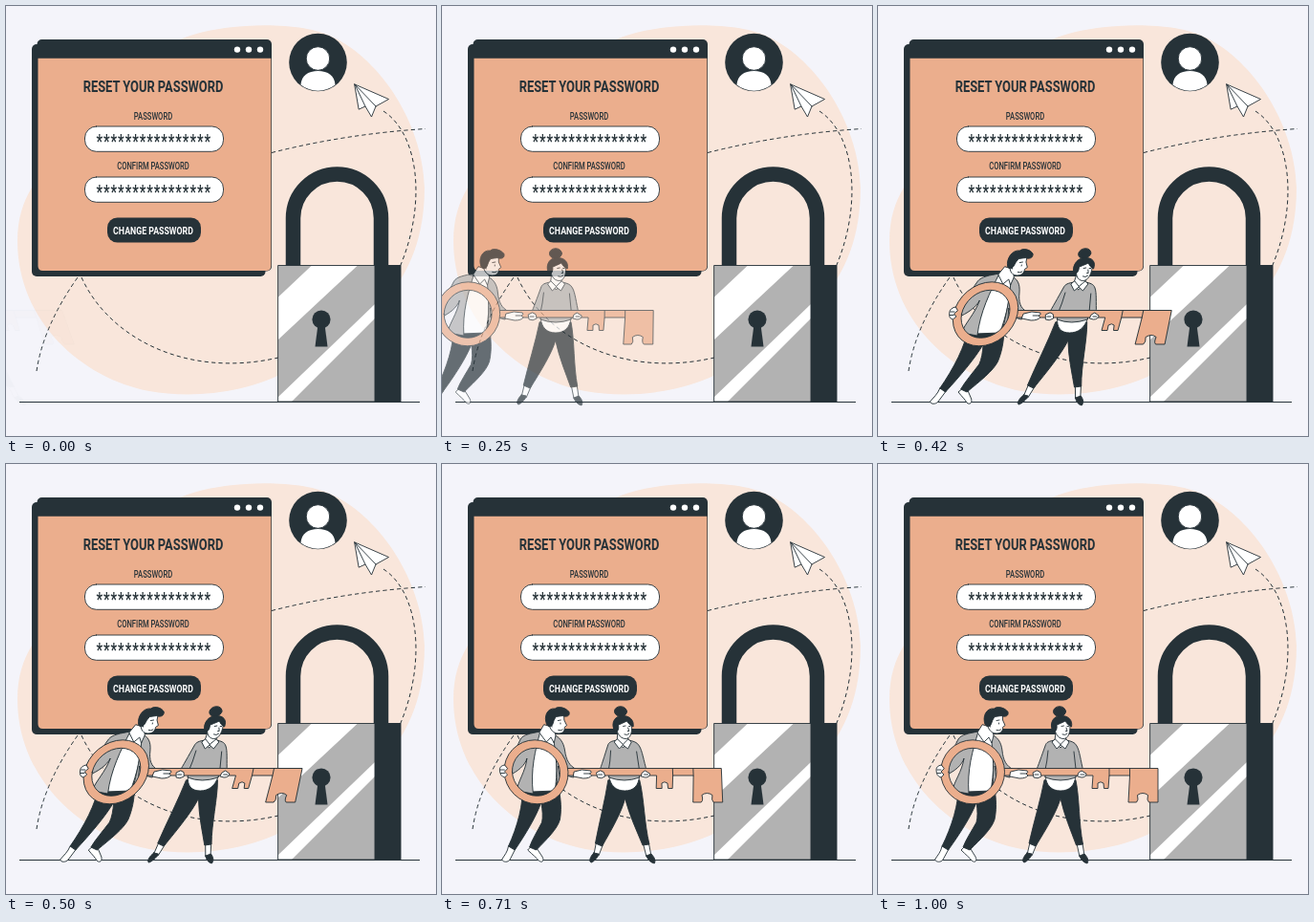
Recreate the animation shown at these times as an HTML page. Size 450 by 450 pixels, loop 1040 ms.

```html
<!DOCTYPE html>
<html lang="en">
<head>
<meta charset="utf-8">
<title>Reset your password</title>
<style>
  html, body { margin: 0; width: 100%; height: 100%; overflow: hidden; background: #f4f4fa; }
  svg { display: block; width: 100vw; height: 100vh; --ink: #263238; stroke-linejoin: round; stroke-linecap: round; }
  .ink { fill: var(--ink); }
  .white { fill: #fff; }
  .grey { fill: #b2b2b2; }
  .peach { fill: #ebae8d; }
  .line { stroke: var(--ink); stroke-width: .9; }
  .dash { fill: none; stroke: var(--ink); stroke-dasharray: 4.2 3.2; stroke-linecap: butt; }
  text { font: 500 10.2px Roboto, "Open Sans", sans-serif; text-anchor: middle; fill: var(--ink); }
  .title { font-size: 17.2px; font-weight: 700; }
  .stars { font-size: 20px; letter-spacing: 1.2px; }
  .action { font-size: 11.7px; font-weight: 700; fill: #fff; }
</style>
</head>
<body>
<svg viewBox="0 0 450 450">
  <path fill="#f9e6db" d="M12 246C12 222 18 205 27 190C58 140 115 55 196 30C238 17 312 16 343 33C392 57 436 122 438 190C438 290 380 335 300 379C250 408 190 410 150 403C80 390 12 330 12 246Z"/>

  <g class="dash">
    <path d="M278 153.500Q355 134 439 128.500"/>
    <path d="M395 110C432 134 440 206 413 271"/>
    <path d="M32 382Q39 335 75 284"/>
    <path d="M79 284C108 348 190 390 285 368"/>
  </g>
  <path class="ink" d="M14 414h419v1H14z"/>

  <!-- Browser window -->
  <g class="ink">
    <rect x="27" y="40" width="244.500" height="243" rx="5"/>
    <rect x="32.500" y="35" width="245.500" height="242.500" rx="5"/>
  </g>
  <path class="peach" d="M33.500 54.700H277.300V272q0 5-5 5H38.500q-5 0-5-5Z"/>
  <g class="white">
    <circle cx="242" cy="45.600" r="3.200"/>
    <circle cx="254" cy="45.600" r="3.200"/>
    <circle cx="266" cy="45.600" r="3.200"/>
  </g>
  <g class="white line">
    <rect x="82.500" y="126" width="145" height="26.300" rx="12"/>
    <rect x="82.500" y="179" width="145" height="26.300" rx="12"/>
  </g>
  <rect class="ink" x="106" y="221.500" width="98" height="26" rx="10.500"/>
  <g transform="translate(154) scale(.75 1)">
    <text class="title" y="90">RESET YOUR PASSWORD</text>
    <text y="118.900">PASSWORD</text>
    <text class="stars" x="1" y="149.500">****************</text>
    <text y="171.500">CONFIRM PASSWORD</text>
    <text class="stars" x="1" y="202.500">****************</text>
    <text class="action" y="239.300">CHANGE PASSWORD</text>
  </g>

  <!-- Avatar and paper plane -->
  <circle class="ink" cx="326.500" cy="59" r="30.300"/>
  <g class="white">
    <path d="M308.500 82.500C309 73 316 68 326.500 68S344 73 344.500 82.500A29.500 29.500 0 0 1 308.500 82.500Z"/>
    <circle class="line" cx="326.500" cy="55" r="12.300"/>
  </g>
  <path class="white line" d="M365 82L400.500 97.500L387 105L382.500 116L376 105L369.500 108ZL387 105M365 82L376 105"/>

  <!-- Padlock -->
  <path fill="none" stroke="#263238" stroke-width="15.500" stroke-linecap="butt" d="M300.500 272V222a46 46 0 0 1 92 0V272"/>
  <path class="grey" d="M285 271.500H386V414H285z"/>
  <path class="white" d="M285 304.500L320 271.500H368L285 349ZM386 312V327L299 414H285V409Z"/>
  <path class="line" fill="none" d="M285 271.500H386V414H285z"/>
  <path class="ink" d="M386 271H413.500V414H386z"/>
  <circle class="ink" cx="330" cy="328" r="9.600"/>
  <path class="ink" d="M326.500 333H333.500L336.500 356.500H323.500Z"/>

  <g id="crew" class="line">
    <!-- Man -->
    <path class="white" d="M67 400C66 406 62 410 59.500 414C61 417 66 417 68 414L74 403ZM90 401L87 404C92 409 96 412 98 415C102 418 104 415 102 411L97 403Z"/>
    <path class="ink" d="M84 336C85 355 77 380 67 400L73.500 404C85 388 98 368 103 354Q105 367 103 375C98 384 92 393 89 401L96 404C108 392 119 382 122 372C125 358 123 345 121 334Z"/>
    <path class="white" d="M104 281L119 285C122 305 121 325 118 342L93 343C94 320 96 300 104 281Z"/>
    <path class="grey" d="M105 280C95 282 87 283 84 288C78 300 72 311 65 317L70 326C80 322 88 315 90 308C88 322 79 333 78 342L95 345C93 320 99 300 105 280Z"/>
    <path class="grey" d="M118 283C125 285 129 291 130 300C131 310 134 316 142 320L138 328C130 327 126 322 122 316Q124 330 125 340L120 342C121 322 121 305 118 283Z"/>
    <path class="white" d="M109 273L104 281L111 291L116 286L119 292L121 284L119 276Z"/>
    <path class="white" d="M114 264C113 275 117 282 124 282C129 282 131 279 130.500 275.500L133 273.500L130.500 268V262H114Z"/>
    <path class="ink" d="M112 272C109 265 113 255 121.500 256C125 253 133 255 136 259.500C137 264 133 265 129 263.500L122 264.500Q119.500 268 118.500 272C117 275.500 114 276 112 272Z"/>
    <path fill="none" d="M124 268.500l3-.5M126.500 271v1M124 278.500q2.500 1 4.500-.5M115.500 271q2 1 2 4"/>

    <!-- Woman -->
    <path class="white" d="M159 396L156 409L161 410L166 398ZM208 397L211 411L216 410L214 397Z"/>
    <path class="ink" d="M156 407L161 408C160 412 156 416 153 417C150 416 152 411 156 407ZM211 410L216 408C219 411 221 415 219 418C215 417 212 414 211 410Z"/>
    <path class="ink" d="M174 331C170 352 163 375 158 397L165 400C176 382 187 364 191 350C195 368 202 384 207.500 399L214.500 398C210 376 211 350 207 331Z"/>
    <path class="white" d="M175 326C176 337 182 342 191 342S206 337 207 326Z"/>
    <path class="grey" d="M185 289C179 290 176 291 175 295C171 306 168 315 165 322L170 326L175 320V328Q191 334 207 328V318L210 326L215 322C212 310 211 300 208 295C206 291 202 290 197 289Z"/>
    <path fill="none" d="M178 300Q177 312 175 320M205 301L207 319"/>
    <path class="white" d="M186 280L185 290L191 297L197 290L196 284Z"/>
    <path class="white" d="M185 288L182 291L187 298L191 294ZM197 288L200 291L196 298L191 294Z"/>
    <path class="white" d="M184 270C184 281 188 287.500 194 287.500C199 287.500 201 282 201 274L199 266H186Z"/>
    <ellipse class="ink" cx="190" cy="259" rx="6.500" ry="5.300"/>
    <path class="ink" d="M184 281C179 275 181 264 191 263.500C199 263 204 268 202.500 275Q198 273 196 269Q190 272 187 273Q188 279 184 281Z"/>
    <path fill="none" d="M192 274.500l2.500-.5M198 274.500h1.500M197 276l1 3.500h-1.500M193 283q3 1.500 5-.8"/>

    <!-- Key -->
    <path class="peach" d="M130 318.500H293V354H283.500Q281 352 282.500 346.500Q277 342.500 271.500 346.500Q273 352 270.500 354H262L263.500 326H242L241 339.500H236.500L236 334Q233 331.500 230 334V339.500H224L225 326H130Z"/>
    <path class="peach" fill-rule="evenodd" d="M65.500 322.300a33.500 33.500 0 1 1 67 0a33.500 33.500 0 1 1-67 0ZM74 322.300a25 25 0 1 0 50 0a25 25 0 1 0-50 0Z"/>
    <path fill="none" d="M242 318.500V326M263.500 318.500V326"/>

    <!-- Hands -->
    <g class="white">
      <path d="M66 315Q61 316 61 320Q61 327 66 328L69 325L66 322L69 319Z"/>
      <path d="M139 322L147 320L156 321Q158 323 155 324L157 326Q155 329 148 329L138 327Z"/>
      <path d="M166 321L162 323L163 328Q167 330 171 327L170 323Z"/>
      <path d="M210 323L213 321L218 324Q218 328 213 328L209 327Z"/>
    </g>
    <path fill="none" d="M62 320h4M62 323.500h4M149 324h6M164 325h4M212 325h4"/>
  </g>
</svg>
<script>
  const LOOP = 1040, FRAME = 1000 / 24, PIVOT = 335.5;
  const crew = document.getElementById('crew');

  // Rush in from the left, lean past upright, then settle.
  const poses = [
    { at: 0, x: -232, skew: 20, opacity: 0 },
    { at: 600, x: 0, skew: -10, opacity: 1 },
    { at: 800, x: 0, skew: 2, opacity: 1 },
    { at: 1000, x: 0, skew: 0, opacity: 1 }
  ];

  const bezier = (a, b, s) => 3 * a * s * (1 - s) ** 2 + 3 * b * s * s * (1 - s) + s ** 3;

  // cubic-bezier(.36, -.01, .5, 1.38), solved by bisection
  function ease(p) {
    let low = 0, high = 1;
    for (let i = 0; i < 24; i++) {
      const mid = (low + high) / 2;
      if (bezier(.36, .5, mid) < p) low = mid; else high = mid;
    }
    return bezier(-.01, 1.38, low);
  }

  function setPose(time) {
    const next = Math.max(1, poses.findIndex(pose => pose.at >= time));
    const from = poses[next - 1], to = poses[next];
    const p = ease((time - from.at) / (to.at - from.at));
    const mix = key => from[key] + (to[key] - from[key]) * p;
    crew.setAttribute('transform',
      `translate(${mix('x')} ${PIVOT}) skewX(${mix('skew')}) translate(0 ${-PIVOT})`);
    crew.setAttribute('opacity', Math.min(1, Math.max(0, mix('opacity'))));
  }

  const start = performance.now();
  function draw() {
    const t = (performance.now() - start) % LOOP;
    const step = Math.floor((t + 4.9) / FRAME);
    setPose(Math.min(1000, (Math.max(step, 0.2) + .8) * FRAME));
    requestAnimationFrame(draw);
  }
  draw();
</script>
</body>
</html>
```
